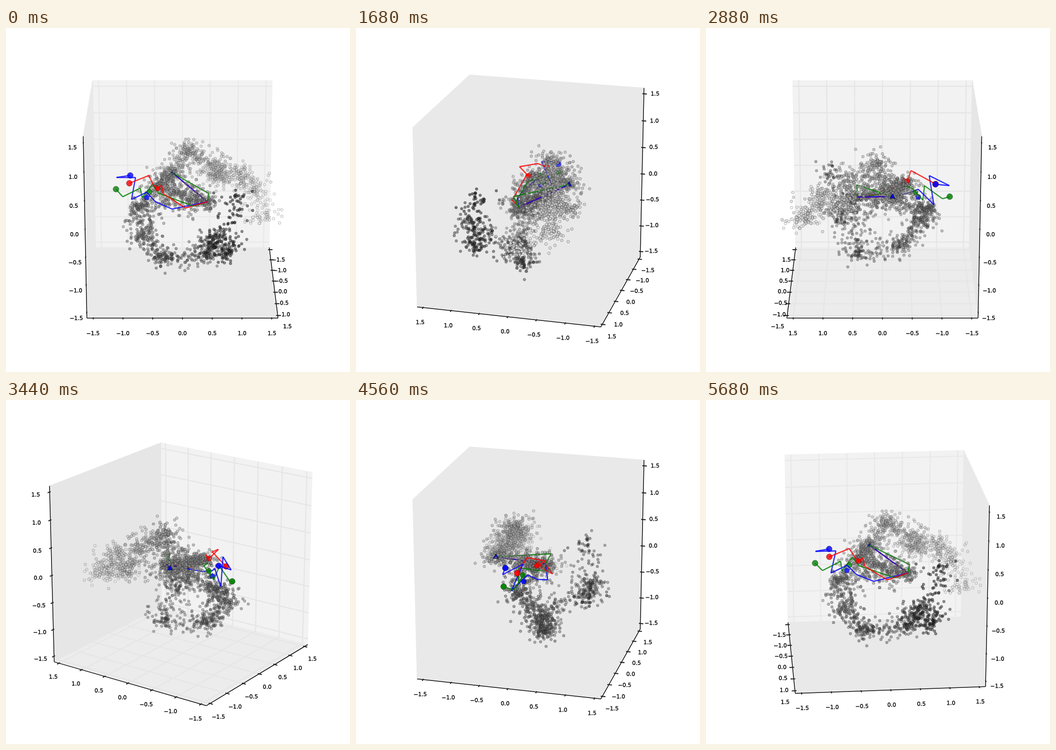
An HTML page with a canvas for the animation above (5760 ms loop, 748 by 748 pixels).

```html
<!DOCTYPE html>
<html lang="en">
<head>
<meta charset="utf-8">
<title>Rotating 3D scatter plot</title>
<style>
  html, body { margin: 0; width: 100%; height: 100%; overflow: hidden; background: #fff; }
  canvas { display: block; width: 748px; height: 748px; }
</style>
</head>
<body>
<canvas id="stage" width="748" height="748"></canvas>
<script>
const ctx = document.getElementById('stage').getContext('2d');
const TAU = Math.PI * 2, RAD = Math.PI / 180;
const STEP_MS = 80, STEPS = 72;

// Box size and camera, in data units
const EDGE = 1.608, LABEL = 1.775, DIST = 30.874, SCALE = 3867;
const TICK_OUT = 0.054, TICK_IN = 0.027;
const TICKS = Array.from({ length: 7 }, (_, i) => i / 2 - 1.5);
const CE = Math.cos(20 * RAD), SE = Math.sin(20 * RAD);

const HUB = [.12, .43, -.07], END = [-.61, -.17, .2];

// The cloud follows this winding line and darkens along it
const SPINE = [
  [0, 1.41, -.45], [-.7, 1.27, -.12], [-.5, 1.05, .24], [-.8, .6, .03],
  [-.4, .6, .4], [-.35, .1, .75], END, [.1, -.4, .2],
  HUB, [-.1, -.78, -.2], [.35, -.68, -.62], [.3, -.35, -1.04],
  [0, .45, -1.1], [1, .55, -.35], [.82, .74, -.81], [.68, .91, .3]
];

const TRACKS = [
  { color: '#ff0000', knot: [.19, -.43, .2], path: [
    [-.02, -.92, .22], [.06, -.58, .39], [.37, -.5, .33], [.19, -.43, .2],
    [.19, -.36, .26], [.26, -.33, .13], [.35, .05, -.1], HUB, END] },
  { color: '#008000', knot: [-.02, -.57, .06], path: [
    [-.19, -1.16, .05], [-.05, -1.04, -.04], [.06, -.73, .16], [-.06, -.7, -.06],
    [-.1, -.52, .17], [.19, -.41, .11], [.26, .19, -.1], HUB, [.22, .45, .12], END] },
  { color: '#0000ff', knot: [.01, -.62, -.03], path: [
    [-.23, -.91, .29], [-.21, -1.15, .26], [.05, -.81, .35], [-.13, -.89, -.12],
    [.08, -.62, .09], [.22, -.47, -.03], [.32, -.18, -.13], HUB, END] }
];

function seeded(seed) {
  return () => {
    seed = seed + 0x6D2B79F5 | 0;
    let t = Math.imul(seed ^ seed >>> 15, 1 | seed);
    t = t + Math.imul(t ^ t >>> 7, 61 | t) ^ t;
    return ((t ^ t >>> 14) >>> 0) / 4294967296;
  };
}

const rand = seeded(11);
const scatter = () => rand() + rand() - 1;
const smooth = t => t * t * t * (t * (6 * t - 15) + 10);

function cloudPoint() {
  const r = rand(), last = SPINE.length - 1;
  const along = last * Math.min(.9999, Math.max(0, r + 0.07 * Math.sin(TAU * r)));
  const i = Math.floor(along), u = along - i;
  const loose = rand() < 0.5;
  const mix = loose ? u : smooth(u);
  const spread = loose ? 0.42 : 0.19;
  const at = SPINE[i].map((v, k) =>
    v + (SPINE[i + 1][k] - v) * mix + scatter() * spread * (k === 2 ? 0.65 : 1));
  return { at, grey: Math.round(230 - 205 * along / last + scatter() * 20) };
}

const cloud = Array.from({ length: 2050 }, cloudPoint);

let ca = 1, sa = 0;

function project([x, y, z]) {
  const right = y * ca - x * sa;
  const toward = x * ca + y * sa;
  const near = toward * CE + z * SE;
  const k = SCALE / (DIST - near);
  return { x: 383.7 + right * k, y: 364.4 - (z * CE - toward * SE) * k, near };
}

function trace(points) {
  ctx.beginPath();
  for (const p of points.map(project)) ctx.lineTo(p.x, p.y);
}

function line(points, color, width) {
  trace(points);
  ctx.strokeStyle = color;
  ctx.lineWidth = width;
  ctx.stroke();
}

function pane(points, color) {
  trace(points);
  ctx.closePath();
  ctx.fillStyle = ctx.strokeStyle = color;
  ctx.lineWidth = 1;
  ctx.fill();
  ctx.stroke();
}

function drawBox(deg, sx, sy) {
  const E = EDGE, bx = -sx * E, by = -sy * E;
  const light = Math.abs(ca) > 0.7;
  const full = light && deg > 20 && deg < 340;
  const dark = full ? '#e6e6e6' : '#e9e9e9';
  const square = [[-E, -E], [E, -E], [E, E], [-E, E]];
  pane(square.map(([a, b]) => [bx, a, b]), light ? '#f2f2f2' : dark);
  pane(square.map(([a, b]) => [a, by, b]), dark);
  pane(square.map(([a, b]) => [a, b, -E]), full ? '#ececec' : dark);
  for (const v of TICKS) {
    line([[v, by, E], [v, by, -E], [v, -by, -E]], dark, 2.6);
    line([[bx, v, E], [bx, v, -E], [-bx, v, -E]], dark, 2.6);
    line([[-bx, by, v], [bx, by, v], [bx, -by, v]], dark, 2.6);
  }
}

function drawAxis(edgeAt, tickAt, labelAt) {
  line([edgeAt(-EDGE), edgeAt(EDGE)], '#000', 1.5);
  for (const v of TICKS) {
    line([tickAt(v, EDGE - TICK_IN), tickAt(v, EDGE + TICK_OUT)], '#222', 2.2);
    const p = project(labelAt(v));
    const text = (v < 0 ? '\u2212' : '') + Math.abs(v).toFixed(1);
    ctx.fillText(text, p.x, p.y + 5);
    ctx.strokeStyle = '#000';
    ctx.lineWidth = 0.35;
    ctx.strokeText(text, p.x, p.y + 5);
  }
}

function drawAxes(sx, sy) {
  const E = EDGE, L = LABEL;
  ctx.font = '12px "DejaVu Sans", sans-serif';
  ctx.textAlign = 'center';
  ctx.textBaseline = 'middle';
  ctx.fillStyle = '#000';
  drawAxis(v => [v, sy * E, -E], (v, r) => [v, sy * r, -E], v => [v, sy * L, -L]);
  drawAxis(v => [sx * E, v, -E], (v, r) => [sx * r, v, -E], v => [sx * L, v, -L]);
  drawAxis(v => [sx * E, -sy * E, v], (v, r) => [sx * r, -sy * E, v], v => [sx * L, -sy * L, v]);
}

const opacity = near => Math.max(0.25, Math.min(0.65, 0.45 + near * 0.14));

function dot(p, grey) {
  const a = opacity(p.near);
  ctx.beginPath();
  ctx.arc(p.x, p.y, 3, 0, TAU);
  ctx.fillStyle = `rgba(${grey},${grey},${grey},${a})`;
  ctx.fill();
  ctx.strokeStyle = `rgba(0,0,0,${a * 0.8})`;
  ctx.lineWidth = 0.7;
  ctx.stroke();
}

// A regular polygon; many sides make a disc
function marker(p, color, sides) {
  ctx.globalAlpha = Math.min(1, opacity(p.near) + 0.35);
  ctx.beginPath();
  for (let i = 0; i < sides; i++) {
    const a = i / sides * TAU - Math.PI / 2;
    ctx.lineTo(p.x + 6.4 * Math.cos(a), p.y + 6.4 * Math.sin(a));
  }
  ctx.closePath();
  ctx.fillStyle = color;
  ctx.fill();
  ctx.strokeStyle = 'rgba(0,0,0,.6)';
  ctx.lineWidth = 0.8;
  ctx.stroke();
  ctx.globalAlpha = 1;
}

function segment(ends, color) {
  ctx.globalAlpha = 0.8;
  line(ends, color, 2.6);
  ctx.globalAlpha = 1;
}

function drawData() {
  const LIFT = 0.15;
  const items = cloud.map(c => {
    const p = project(c.at);
    return { near: p.near, paint: () => dot(p, c.grey) };
  });
  for (const { color, path, knot } of TRACKS) {
    const mark = (at, sides) => {
      const p = project(at);
      items.push({ near: p.near + LIFT, paint: () => marker(p, color, sides) });
    };
    path.slice(1).forEach((b, i) => {
      const a = path[i];
      const near = (project(a).near + project(b).near) / 2 + LIFT;
      items.push({ near, paint: () => segment([a, b], color) });
    });
    mark(path[0], 40);
    mark(knot, 5);
    mark(END, 3);
  }
  items.sort((a, b) => a.near - b.near);
  for (const item of items) item.paint();
}

function draw(step) {
  const deg = step * 360 / STEPS;
  ca = Math.cos(deg * RAD);
  sa = Math.sin(deg * RAD);
  const sx = ca > -1e-9 ? 1 : -1, sy = sa > -1e-9 ? 1 : -1;
  ctx.fillStyle = '#fff';
  ctx.fillRect(0, 0, 748, 748);
  ctx.lineJoin = 'round';
  drawBox(deg, sx, sy);
  drawAxes(sx, sy);
  drawData();
}

const start = performance.now();
let shown = -1;
function tick() {
  const step = Math.floor((performance.now() - start) / STEP_MS) % STEPS;
  if (step !== shown) draw(shown = step);
  requestAnimationFrame(tick);
}
tick();
</script>
</body>
</html>
```
